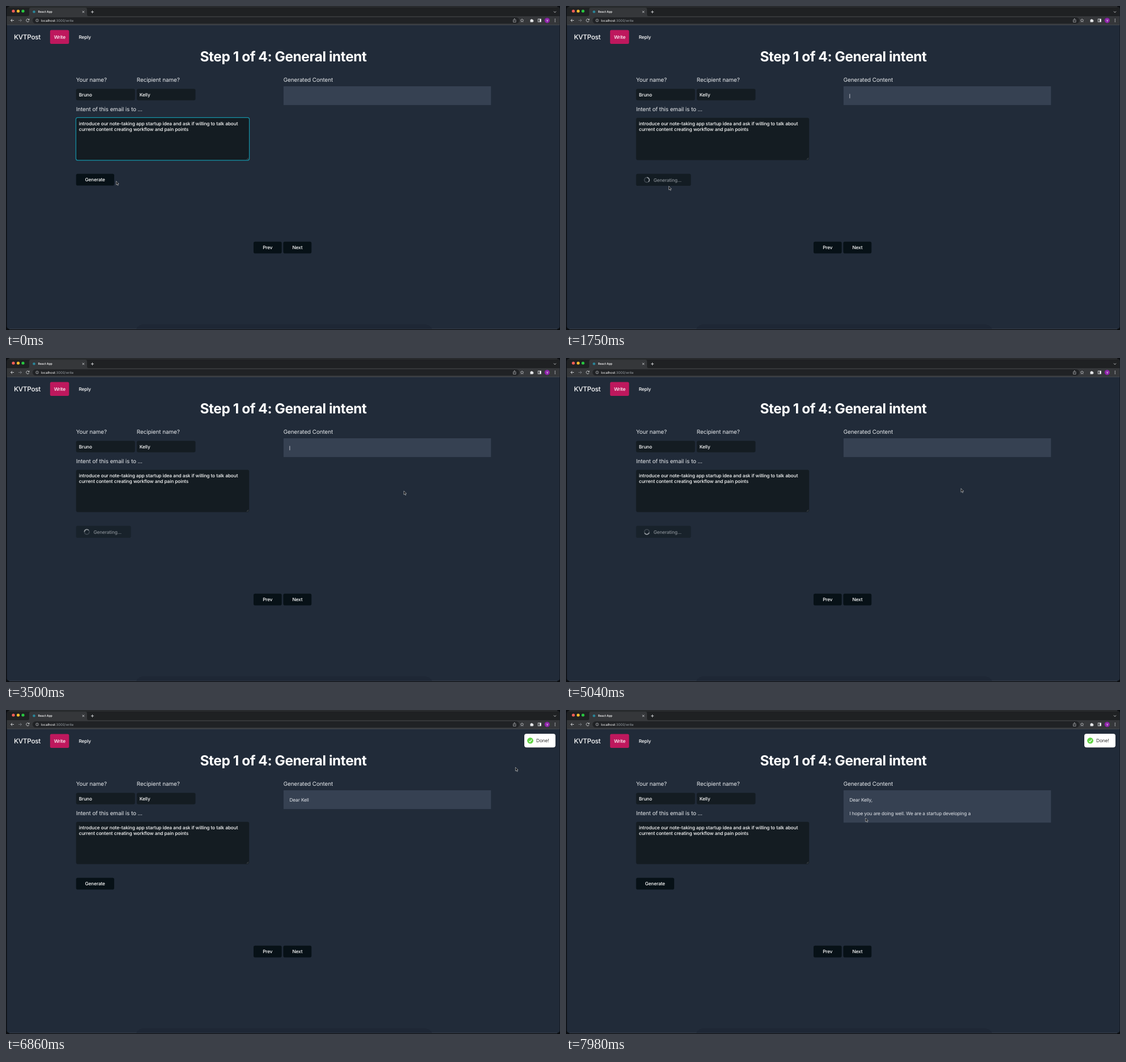
These frames come from a looping animation (978x573 px, 8000 ms). An HTML page:

```html
<!DOCTYPE html>
<html lang="en">
<head>
<meta charset="utf-8">
<title>Email writer</title>
<style>
  html, body { margin: 0; width: 100%; height: 100%; overflow: hidden; background: #0b0d10; }
  svg { display: block; width: 978px; height: 573px; }
  text {
    font: 400 8.4px Inter, "Liberation Sans", sans-serif;
    letter-spacing: -.017em; fill: #fff; white-space: pre;
    text-rendering: geometricPrecision;
  }
  .title { font-size: 24.5px; font-weight: 700; letter-spacing: -.019em; text-anchor: middle; }
  .brand { font-size: 11.7px; font-weight: 500; letter-spacing: -.02em; }
  .label { font-size: 9.9px; letter-spacing: -.007em; fill: #e8ebee; }
  .btn, .entry { font-size: 8.3px; font-weight: 500; }
  .btn { text-anchor: middle; }
  .entry { letter-spacing: -.011em; }
  .output { fill: #e2e5ea; }
  .tab { font-size: 5.3px; font-weight: 500; }
  .url { font-size: 5.95px; letter-spacing: -.005em; fill: #9aa0a6; }
  .field { fill: #141c22; }
  .dark { fill: #071117; }
  .icon { fill: none; stroke: #d5d7da; stroke-width: .9; }
</style>
</head>
<body>
<svg viewBox="0 0 978 573">
  <defs>
    <clipPath id="page"><rect x="2" y="33" width="975" height="538"/></clipPath>
  </defs>

  <!-- window -->
  <rect x="1.5" y="1" width="976" height="570.5" rx="5" fill="#212b39"/>
  <path d="M1.5 18V6q0-5 5-5H972.5q5 0 5 5V18z" fill="#1f2123"/>
  <path d="M6 1.2H973" stroke="#55585b" stroke-width=".7"/>
  <path d="M38 18q3 0 3-3V6q0-3 3-3H140q3 0 3 3v9q0 3 3 3z" fill="#35373a"/>
  <rect x="1.5" y="18" width="976" height="15.5" fill="#35373a"/>
  <rect x="47" y="20" width="859" height="11" rx="5.5" fill="#202225"/>
  <path d="M2 33.5H977" stroke="#4a4e53" stroke-width=".8"/>
  <path d="M6 571.2H973" stroke="#444c57" stroke-width=".8"/>
  <path d="M230 571q4-8 14-8H738q10 0 14 8z" fill="#1e2735"/>

  <!-- browser bar -->
  <circle cx="13" cy="9" r="2.6" fill="#fe5f57"/>
  <circle cx="21.5" cy="9" r="2.6" fill="#febc2e"/>
  <circle cx="30" cy="9" r="2.6" fill="#28c840"/>
  <circle cx="49.5" cy="10.3" r="2.3" fill="#2b8599"/>
  <text class="tab" x="56.5" y="12.2">React App</text>
  <g class="icon">
    <path d="M134.800 8.700l3.400 3.400m0-3.400l-3.400 3.400M150 10.500h5m-2.500-2.500v5M967 9.500l2 2l2-2"/>
    <path d="M14 25.500H8.500m2.500-2.500l-2.500 2.500l2.500 2.500"/>
    <path d="M22 25.500h5.500m-2.500-2.500l2.500 2.500l-2.500 2.500" stroke="#777b80"/>
    <path d="M40.500 24a2.600 2.600 0 1 0 .2 2.500M41 22.500v2h-2"/>
    <circle cx="55" cy="25.5" r="2.4" stroke-width=".6"/>
    <path d="M55 25.200v1.600m0-3v.7" stroke-width=".6"/>
    <path d="M896.500 24.500h-1v4h4.500v-4h-1m-1.300 2.200v-4.500m-1.300 1.300l1.300-1.300l1.300 1.300" stroke-width=".6"/>
    <path d="M911 22.700l.9 1.900l2 .2l-1.500 1.400l.4 2l-1.800-1l-1.800 1l.4-2l-1.500-1.400l2-.2z" stroke-width=".6"/>
    <rect x="939.3" y="23" width="5" height="5"/>
  </g>
  <path d="M925.500 24h1.500a1 1 0 0 1 2 0h1.500v1.500a1 1 0 0 1 0 2V28.500h-5z" fill="#e4e6e8"/>
  <rect x="942" y="23" width="2.5" height="5" fill="#e4e6e8"/>
  <circle cx="955.3" cy="25.6" r="4.6" fill="#8e24aa"/>
  <text class="tab" x="953.7" y="27.5">Y</text>
  <g fill="#d5d7da">
    <circle cx="969.3" cy="23.3" r=".7"/><circle cx="969.3" cy="25.5" r=".7"/><circle cx="969.3" cy="27.7" r=".7"/>
  </g>
  <text class="url" x="61.800" y="27.500"><tspan fill="#fff">localhost</tspan>:3000/write</text>

  <!-- navigation -->
  <text class="brand" x="14" y="59.3">KVTPost</text>
  <rect x="77.8" y="42.4" width="33.5" height="24.6" rx="2.5" fill="#be185d"/>
  <text class="btn" x="94.8" y="57.7">Write</text>
  <text class="btn" x="139.2" y="57.7">Reply</text>
  <text class="title" x="489.5" y="98">Step 1 of 4: General intent</text>

  <!-- form -->
  <text class="label" x="123.7" y="134.2">Your name?</text>
  <text class="label" x="230.8" y="134.2">Recipient name?</text>
  <rect class="field" x="123.7" y="146.5" width="104" height="20.3" rx="2.8"/>
  <rect class="field" x="230.8" y="146.5" width="103.7" height="20.3" rx="2.8"/>
  <text class="entry" x="128.7" y="159.8">Bruno</text>
  <text class="entry" x="235.8" y="159.8">Kelly</text>
  <text class="label" x="123.7" y="186">Intent of this email is to ...</text>
  <rect class="field" x="123.7" y="197.7" width="305.5" height="74.7" rx="2.8"/>
  <rect id="focus" x="123.4" y="197.3" width="306.2" height="75.5" rx="3" fill="none" stroke="#1492a6" stroke-width="1.2"/>
  <path d="M425 271.5l3-3m-1.2 3l1.2-1.2" stroke="#7c8288" stroke-width=".5"/>
  <text class="entry" x="128.7" y="211.3">introduce our note-taking app startup idea and ask if willing to talk about</text>
  <text class="entry" x="128.7" y="221.1">current content creating workflow and pain points</text>

  <g id="idle">
    <rect class="dark" x="123.7" y="296.7" width="67.3" height="20.9" rx="2.8"/>
    <text class="btn" x="157.2" y="310.4">Generate</text>
  </g>
  <g id="busy">
    <rect id="busyBox" x="123.7" y="296.7" width="96.8" height="21.4" rx="2.8"/>
    <g fill="none" stroke-width="1.6">
      <circle cx="142.7" cy="307.6" r="4.3" stroke="#3f4851"/>
      <path id="arc" d="M142.700 303.300A4.300 4.300 0 0 0 139.800 310.800" stroke="#949aa0"/>
    </g>
    <text class="btn" x="179.2" y="311" style="fill:#858c93">Generating...</text>
  </g>

  <rect class="dark" x="437" y="416.7" width="49.7" height="20.8" rx="2.8"/>
  <rect class="dark" x="489.5" y="416.7" width="49.8" height="20.8" rx="2.8"/>
  <text class="btn" x="461.8" y="430.4">Prev</text>
  <text class="btn" x="514.4" y="430.4">Next</text>

  <!-- generated letter -->
  <text class="label" x="489.8" y="134.2">Generated Content</text>
  <rect id="box" x="490" y="142" width="366.2" height="33.2" fill="#364152"/>
  <path id="caret" d="M500.900 155.500v7.700" stroke="#e2e5ea" stroke-width=".8"/>
  <text class="output" id="line0" x="500.4" y="161.5"></text>
  <text class="output" id="line2" x="500.4" y="185.6"></text>

  <!-- toast -->
  <g clip-path="url(#page)">
    <g id="toast">
      <rect x="914.5" y="42.5" width="56" height="25" rx="4.5" fill="#000" opacity=".16"/>
      <rect x="915" y="42" width="55" height="24.3" rx="4" fill="#fff"/>
      <g id="badge">
        <circle cx="925.5" cy="54.2" r="5.4" fill="#61d345"/>
        <path id="tick" d="M923.200 54.600l1.800 1.700l3.200-3.900" fill="none" stroke="#fff" stroke-width="1.2" pathLength="1" stroke-dasharray="1 2"/>
      </g>
      <text x="936" y="57.1" style="fill:#363636">Done!</text>
    </g>
  </g>

  <path id="pointer" d="M0 0V6.600L1.600 5.200L2.700 7.700L3.800 7.200L2.700 4.800H4.700Z" fill="#111" stroke="#d6d9dc" stroke-width=".6"/>
</svg>
<script>
  const LOOP = 8000, STEP = 70;
  const CLICK = 350, DONE = 6510, TYPE = 6692, RATE = 60 / 1120;
  const LETTER = "Dear Kelly,\n\nI hope you are doing well. We are a startup developing a";

  // pointer tip: time, x, y
  const PATH = [
    [0, 194.5, 309.7], [70, 177, 308.5], [350, 176, 308.5], [980, 178, 317],
    [1400, 180, 321], [1750, 181.5, 318.6], [1890, 186, 326], [2170, 270, 338],
    [2660, 590, 296], [3080, 690, 246], [3500, 702.3, 235], [4340, 700, 233],
    [5040, 697.3, 230.7], [5250, 698, 230.7], [5880, 725, 229], [6370, 719.3, 228.3],
    [6580, 770, 190], [6860, 899.4, 101.3], [7000, 880, 112], [7490, 590, 178],
    [7700, 533, 190], [7980, 528.7, 191]
  ];

  const el = id => document.getElementById(id);
  const show = (id, on) => { el(id).style.display = on ? "" : "none"; };
  const clamp = v => Math.max(0, Math.min(1, v));
  const easeOut = v => 1 - (1 - clamp(v)) ** 3;

  function scaleAt(x, y, s) {
    return `translate(${x} ${y}) scale(${s}) translate(${-x} ${-y})`;
  }

  function pointerAt(t) {
    const i = PATH.findIndex(p => p[0] > t);
    if (i < 0) return PATH[PATH.length - 1].slice(1);
    const [a, b] = [PATH[i - 1], PATH[i]];
    const k = (t - a[0]) / (b[0] - a[0]);
    return [1, 2].map(n => a[n] + (b[n] - a[n]) * k);
  }

  function drawLetter(t) {
    const count = t < TYPE ? 0 : Math.floor(9.01 + (t - 6860) * RATE);
    const lines = LETTER.slice(0, Math.max(0, count)).split("\n");
    el("line0").textContent = lines[0];
    el("line2").textContent = lines[2] || "";
    const rows = count > 13 ? 2 : count > 12 ? 1 : 0;
    el("box").setAttribute("height", 33.2 + rows * 12);
    const blink = (t / 1000 + 0.55) % 1 < 0.5;
    show("caret", t >= CLICK && t < TYPE && blink);
  }

  function drawBusy(t, [x, y]) {
    const hover = x < 220.5 && y < 319;
    el("busyBox").setAttribute("fill", hover ? "#131c23" : "#18222b");
    el("arc").setAttribute("transform", `rotate(${(t * 0.36 + 230) % 360} 142.7 307.6)`);
  }

  function drawToast(age) {
    show("toast", age >= 0);
    const k = easeOut(age / 300);
    el("toast").setAttribute("transform",
      `translate(0 ${-49 * (1 - k)}) ` + scaleAt(942.5, 54, 0.6 + 0.4 * k));
    el("toast").setAttribute("opacity", 0.5 + 0.5 * k);
    el("badge").setAttribute("transform", scaleAt(925.5, 54.2, easeOut((age - 70) / 240)));
    el("tick").setAttribute("stroke-dashoffset", 1 - clamp((age - 180) / 150));
  }

  function draw(now) {
    const t = Math.floor((now % LOOP) / STEP) * STEP;
    const busy = t >= CLICK && t < DONE;
    const tip = pointerAt(t);
    show("focus", t < CLICK);
    show("idle", !busy);
    show("busy", busy);
    drawBusy(t, tip);
    drawLetter(t);
    drawToast(t - DONE);
    el("pointer").setAttribute("transform", `translate(${tip})`);
  }

  const start = performance.now();
  function tick() {
    draw(performance.now() - start);
    requestAnimationFrame(tick);
  }
  tick();
</script>
</body>
</html>
```
